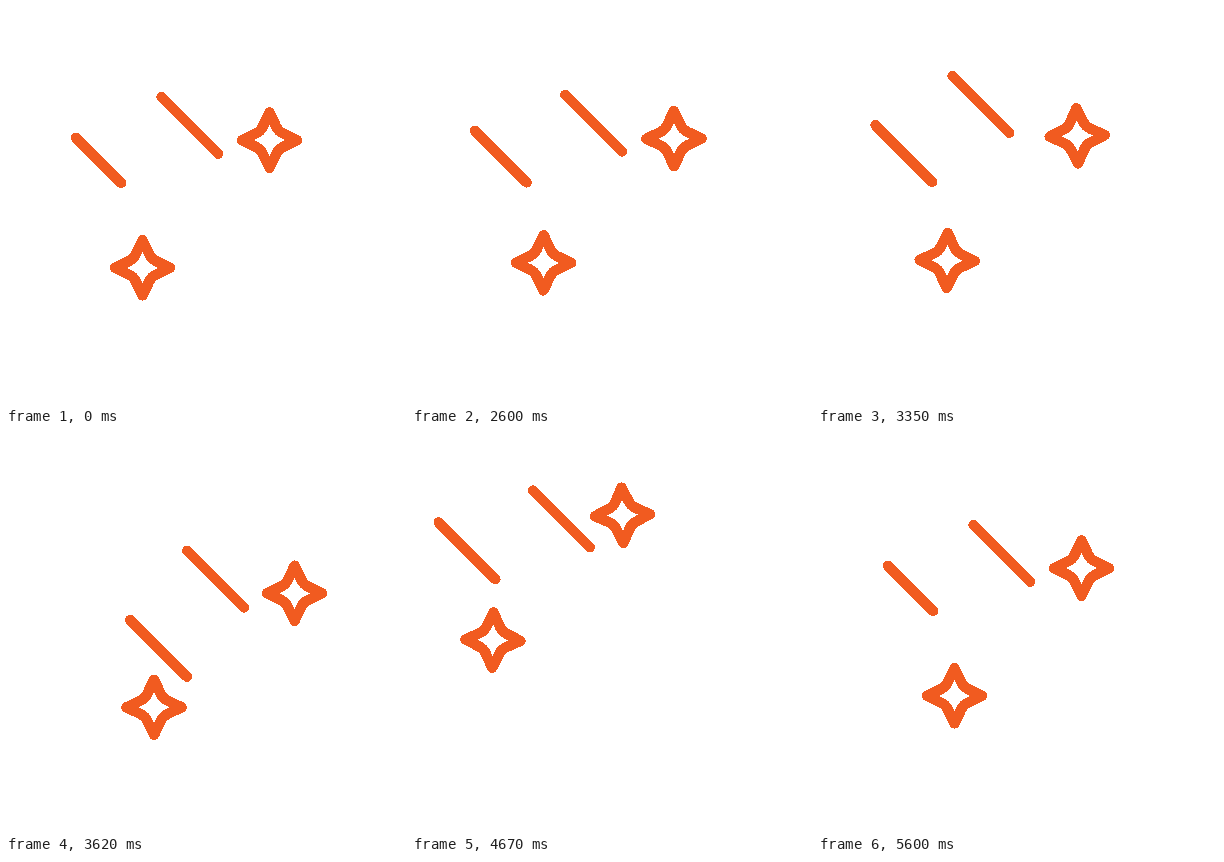
An HTML page that plays this animation: 400 px wide and 400 px high, repeating every 5.66 s.

```html
<!DOCTYPE html>
<html lang="en">
<head>
<meta charset="utf-8">
<title>Shooting stars</title>
<style>
html, body { margin: 0; width: 100%; height: 100%; overflow: hidden; background: #fff; }
svg { display: block; width: 100%; height: 100%; }
g { fill: none; stroke: #f15b20; stroke-width: 10.4; stroke-linecap: round; stroke-linejoin: round; shape-rendering: crispEdges; }
</style>
</head>
<body>
<svg viewBox="0 0 400 400">
  <defs>
    <path id="star" d="M0-27.6L7-13Q9-9 13-7L27.6 0L13 7Q9 9 7 13L0 27.6L-7 13Q-9 9-13 7L-27.6 0L-13-7Q-9-9-7-13Z"/>
  </defs>
  <g id="scene">
    <line id="left"/>
    <line id="right"/>
    <use id="upper" href="#star"/>
    <use id="lower" href="#star"/>
  </g>
</svg>
<script>
const LOOP = 5660, START = 2030, GONE = 3890, BACK = 4220, END = 5600, STEP = 30;
const DRIFT = 1050, LENGTH = 56.7, TRIM = 11.5;

// Each part drifts from `start` to `pull`, dashes off at `dash` and returns from `-far`.
const parts = {
  left: { x: 58.5, y: 120.2, start: 0, pull: -1, dash: 3409, far: 96 },
  right: { x: 155.5, y: 91, start: -.5, pull: -1, dash: 3486, far: 104 },
  upper: { x: 263.5, y: 134.2, start: 2, pull: -4.3, dash: 3480, far: 160 },
  lower: { x: 136.5, y: 261.8, start: -2, pull: -7.3, dash: 3508, far: 168 }
};

const el = id => document.getElementById(id);
const smooth = u => {
  u = Math.min(1, Math.max(0, u));
  return u * u * (3 - 2 * u);
};
const remaining = t => (END - t) / (END - BACK);

// Distance travelled along the diagonal.
function offset(part, t) {
  if (t >= BACK) return -part.far * remaining(t) ** 2.8;
  const drift = part.start + (part.pull - part.start) * smooth((t - START) / DRIFT);
  return drift + .0015 * Math.max(0, t - part.dash) ** 2;
}

function setLine(id, shift, trim) {
  const { x, y } = parts[id];
  const ends = {
    x1: x + shift + trim, y1: y + shift + trim,
    x2: x + shift + LENGTH, y2: y + shift + LENGTH
  };
  for (const name in ends) el(id).setAttribute(name, ends[name]);
}

function setStar(id, shift, angle) {
  const { x, y } = parts[id];
  el(id).setAttribute('transform', `translate(${x + shift} ${y + shift}) rotate(${angle})`);
}

function draw(time) {
  let t = time % LOOP;
  t = t < START ? END : Math.min(END, START + Math.floor((t - START) / STEP) * STEP);
  const hidden = t >= GONE && t < BACK;
  el('scene').style.display = hidden ? 'none' : '';
  if (hidden) return;

  const leaving = t < GONE;
  const phase = (t - START) / DRIFT;
  const sway = leaving ? 10 * (Math.cos(4 * Math.PI * phase) - 1) : 0;
  const spin = leaving ? 2.5 * Math.cos(Math.PI * phase) : -3 * remaining(t);
  const trim = TRIM * (leaving ? 1 - smooth(phase) : smooth((t - 4670) / (END - 4670)));

  setLine('left', offset(parts.left, t), trim);
  setLine('right', offset(parts.right, t) + sway, 0);
  setStar('upper', offset(parts.upper, t), spin);
  setStar('lower', offset(parts.lower, t), -.7 * spin);
}

const begin = performance.now();
(function tick() {
  draw(performance.now() - begin);
  requestAnimationFrame(tick);
})();
</script>
</body>
</html>
```
